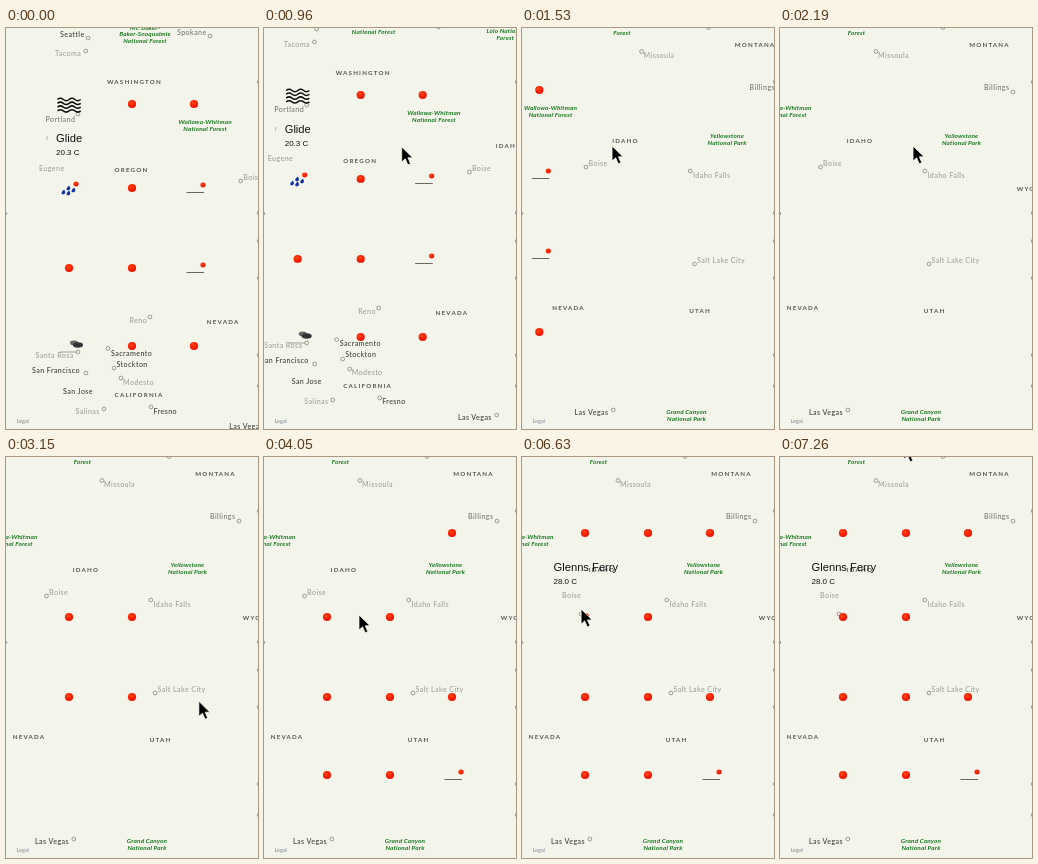
Write an HTML page that moves like this. It is 252 by 401 pixels and loops after 7380 ms.

```html
<!DOCTYPE html>
<html lang="en">
<head>
<meta charset="utf-8">
<title>Weather map</title>
<style>
  html, body { margin: 0; width: 100%; height: 100%; overflow: hidden; background: #f4f5ea; }
  svg { display: block; width: 100%; height: 100%; }
  text { white-space: pre; }
  .state { font: 700 6.2px Lato, sans-serif; letter-spacing: 1.2px; fill: #55554f; text-anchor: middle; }
  .city { font: 500 7.1px Lato, sans-serif; letter-spacing: .42px; fill: #3f3f3c; }
  .city.mid { fill: #777772; }
  .city.faint { fill: #a0a09a; }
  .park { font: italic 700 6.4px Lato, sans-serif; letter-spacing: .15px; fill: #17761f; text-anchor: middle; }
  .ring { fill: #f4f5ea; stroke: #777772; stroke-width: .7; }
  .title { font: 11.2px "Liberation Sans", Arial, sans-serif; fill: #111; }
  .temp { font: 8px "Liberation Sans", Arial, sans-serif; fill: #111; }
  .legal { font: 5.5px Lato, sans-serif; fill: #7d8a94; }
</style>
</head>
<body>
<svg id="stage" viewBox="0 0 252 401">
  <defs>
    <radialGradient id="glow" cx=".4" cy=".35" r=".7">
      <stop offset="0" stop-color="#ff4a12"/>
      <stop offset=".6" stop-color="#fa1c06"/>
      <stop offset="1" stop-color="#e01808"/>
    </radialGradient>
  </defs>
  <rect width="252" height="401" fill="#f4f5ea"/>
  <g id="map"><g id="labels"></g><g id="before"></g></g>
  <g id="after"></g>
  <g id="edge"></g>
  <text class="legal" x="10.5" y="395">Legal</text>
  <path id="cursor" d="M0 0V15L3.6 11.8 6.2 17.8 8.8 16.7 6.3 10.8H11Z" fill="#000" stroke="#fff" stroke-width=".7"/>
</svg>
<script>
const LOOP = 7380;
const START = { x: 194.2, y: 14 };
const $ = id => document.getElementById(id);

function add(parent, tag, attrs, text) {
  const el = document.createElementNS('http://www.w3.org/2000/svg', tag);
  for (const key in attrs) el.setAttribute(key, attrs[key]);
  if (text) el.textContent = text;
  parent.append(el);
  return el;
}

// Labels: the second group is placed as seen before the drag.
const labels = $('labels');
const west = add(labels, 'g', { transform: `translate(${-START.x} ${-START.y})` });

function state(parent, name, x, y) {
  add(parent, 'text', { class: 'state', x, y: y + 2.2 }, name);
}
function city(parent, name, x, y, tone, cx, cy) {
  const g = add(parent, 'g', {});
  add(g, 'text', { class: 'city ' + tone, x, y: y + 2.5 }, name);
  if (cx !== undefined) add(g, 'circle', { class: 'ring', cx, cy, r: 1.9 });
  return g;
}
function park(parent, x, y, ...lines) {
  lines.forEach((line, i) =>
    add(parent, 'text', { class: 'park', x, y: y + 2.2 + i * 6.8 }, line));
}

state(labels, 'MONTANA', 209.5, 16.5);
state(labels, 'IDAHO', 80, 112.5);
state(labels, 'WYOMING', 257, 160.5);
state(labels, 'NEVADA', 23, 280);
state(labels, 'UTAH', 154.5, 282.5);
city(labels, 'Missoula', 98, 27, 'faint', 96, 23.5);
city(labels, 'Billings', 204, 59, 'mid', 233, 64);
const boise = city(labels, 'Boise', 43, 135.5, 'faint', 40.5, 139);
const boiseMoved = add(labels, 'g', {});
city(boiseMoved, 'Boise', 40, 138, 'faint', 59, 157);
city(labels, 'Idaho Falls', 147.5, 147, 'faint', 144.8, 143);
city(labels, 'Salt Lake City', 151.5, 232, 'faint', 149, 236);
city(labels, 'Las Vegas', 29, 384.5, '', 67.8, 382);
add(labels, 'circle', { class: 'ring', cx: 163, cy: -.5, r: 1.9 });
park(labels, 76.5, -1.8, 'Lolo National', 'Forest');
park(labels, 5, 79.7, 'Wallowa-Whitman', 'National Forest');
park(labels, 181.5, 107.7, 'Yellowstone', 'National Park');
park(labels, 141, 384.2, 'Grand Canyon', 'National Park');

state(west, 'WASHINGTON', 128.5, 53.5);
state(west, 'OREGON', 125.5, 142);
state(west, 'CALIFORNIA', 133, 366.5);
city(west, 'Seattle', 54, 6, '', 82, 10);
city(west, 'Tacoma', 49, 25.5, 'faint', 79.8, 23);
city(west, 'Spokane', 171, 4.3, 'mid', 204, 8);
city(west, 'Portland', 39.5, 91, 'mid', 72, 86);
city(west, 'Eugene', 33, 140, 'faint');
city(west, 'Reno', 123.5, 292.5, 'faint', 144, 289);
city(west, 'Santa Rosa', 29.5, 327, 'faint', 72, 324);
city(west, 'San Francisco', 26, 342, '', 80, 345);
city(west, 'San Jose', 57, 363, '');
city(west, 'Sacramento', 105, 325, '', 102, 320.5);
city(west, 'Stockton', 110.5, 336, '', 108, 340);
city(west, 'Modesto', 117, 354, 'faint', 115, 350);
city(west, 'Salinas', 69.5, 383, 'faint', 98, 381);
city(west, 'Fresno', 147.5, 383, '', 145, 379);
park(west, 139, -.7, 'Mt. Baker-', 'Baker-Snoqualmie', 'National Forest');
park(west, 199, 94, 'Wallowa-Whitman', 'National Forest');
west.lastChild.remove();
west.lastChild.remove();
add(west, 'path', { d: 'M41 108v4', stroke: '#999', 'stroke-width': .7 });

// Weather icons
function sun(parent, x, y, r = 4.1) {
  return add(parent, 'ellipse', { cx: x, cy: y, rx: r, ry: r * .95, fill: 'url(#glow)' });
}
function hazy(parent, x, y) {
  const g = add(parent, 'g', {});
  sun(g, x + 9, y - 3, 2.6);
  add(g, 'path', { d: `M${x - 7.5} ${y + 4.5}h17.5`, stroke: '#55554f', 'stroke-width': .9 });
  return g;
}
function fog(parent, x, y) {
  for (let i = 0; i < 4; i++) {
    add(parent, 'path', {
      d: `M${x - 11.5} ${y - 4.5 + i * 3.8}q2.9 -2.4 5.8 0t5.8 0 5.8 0 5.8 0`,
      fill: 'none', stroke: '#111', 'stroke-width': 1.5
    });
  }
}
function rain(parent, x, y) {
  sun(parent, x + 7, y - 4, 2.6);
  for (const [dx, dy] of [[-6, 4], [-1, 0], [-1, 5], [4, 2]]) {
    add(parent, 'path', {
      d: `M${x + dx + 1} ${y + dy - 2.4}q3 4.2 -.8 4.8q-4 -.4 .8 -4.8z`, fill: '#1433a4'
    });
  }
}
function cloud(parent, x, y) {
  add(parent, 'path', { d: `M${x - 9} ${y + 6}h17`, stroke: '#888', 'stroke-width': .8 });
  add(parent, 'ellipse', { cx: x + 5, cy: y - 3, rx: 4, ry: 2.4, fill: '#666' });
  add(parent, 'ellipse', { cx: x + 9, cy: y - 1, rx: 5, ry: 2.7, fill: '#333' });
}
function callout(parent, title, temp, x) {
  const g = add(parent, 'g', {});
  add(g, 'text', { class: 'title', x, y: 114 }, title);
  add(g, 'text', { class: 'temp', x, y: 127.3 }, temp);
  return g;
}

const before = $('before');
before.setAttribute('transform', `translate(${-START.x} ${-START.y})`);
fog(before, 63, 76);
rain(before, 63, 160);
cloud(before, 63, 318);
hazy(before, 188, 160);
hazy(before, 188, 240);
for (const [x, y] of [[126, 76], [188, 76], [126, 160], [63, 240], [126, 240], [126, 318], [188, 318]])
  sun(before, x, y);
callout(before, 'Glide', '20.3 C', 50);

// Arrivals: time, column, row
const arrivals = [
  [2640, 63, 160], [2790, 126, 160], [2970, 63, 240], [3150, 126, 240],
  [3330, 188, 240], [3480, 63, 318], [3660, 126, 318], [3840, 188, 318, hazy],
  [4050, 188, 76], [4380, 126, 76], [4680, 63, 76]
].map(([at, x, y, draw = sun]) => ({ at, el: draw($('after'), x, y) }));
const ferry = callout($('after'), 'Glenns Ferry', '28.0 C', 31.5);

add($('edge'), 'path', { d: 'M.3 184v3', stroke: '#777', 'stroke-width': .8 });
for (const y of [54, 185, 213, 250, 327, 358])
  add($('edge'), 'path', { d: `M251.6 ${y - 1.5}v3`, stroke: '#5b86b5', 'stroke-width': .8 });

// Pointer: time, x, y of the tip
const path = [
  [270, 205, -20], [850, 167, 128], [960, 138, 119], [1200, 62, 114],
  [1530, 90, 118], [2190, 133, 118], [2520, 150, 128], [2900, 196, 245],
  [3300, 191, 244], [3880, 96, 161], [4050, 95, 158], [4560, 95, 158],
  [4770, 58, 155], [6620, 58, 155], [7260, 124, -13]
];
function pointer(t) {
  if (t <= path[0][0]) return { x: path[0][1], y: path[0][2] };
  const i = path.findIndex(p => p[0] > t);
  if (i < 0) return { x: path.at(-1)[1], y: path.at(-1)[2] };
  const [t0, x0, y0] = path[i - 1], [t1, x1, y1] = path[i];
  const k = (t - t0) / (t1 - t0);
  return { x: x0 + (x1 - x0) * k, y: y0 + (y1 - y0) * k };
}

// The map follows the pointer while dragged, then glides to rest.
const GRAB = 850, RELEASE = 1200, REST = 2190, TAU = 260;
function pan(t, p) {
  if (t < GRAB) return START;
  if (t < RELEASE) return { x: p.x + 27.2, y: p.y - 114 };
  if (t >= REST) return { x: 0, y: 0 };
  const end = Math.exp((RELEASE - REST) / TAU);
  const k = (Math.exp((RELEASE - t) / TAU) - end) / (1 - end);
  return { x: 89.2 * k, y: 0 };
}

function show(el, on) { el.style.display = on ? '' : 'none'; }
function move(el, x, y) { el.setAttribute('transform', `translate(${x.toFixed(2)} ${y.toFixed(2)})`); }

function render(t) {
  const p = pointer(t), o = pan(t, p);
  move($('cursor'), p.x, p.y);
  move($('map'), o.x, o.y);
  show(before, t < 1950);
  for (const a of arrivals) show(a.el, t >= a.at);
  const k = Math.min(1, Math.max(0, (t - 5740) / 260));
  const eased = 1 - (1 - k) ** 2;
  ferry.setAttribute('opacity', eased);
  move(ferry, 0, -20 * (1 - eased));
  show(boise, t < 5880);
  show(boiseMoved, t >= 5880);
}

const begin = performance.now();
function tick() {
  render((performance.now() - begin) % LOOP);
  requestAnimationFrame(tick);
}
render(0);
requestAnimationFrame(tick);
</script>
</body>
</html>
```
